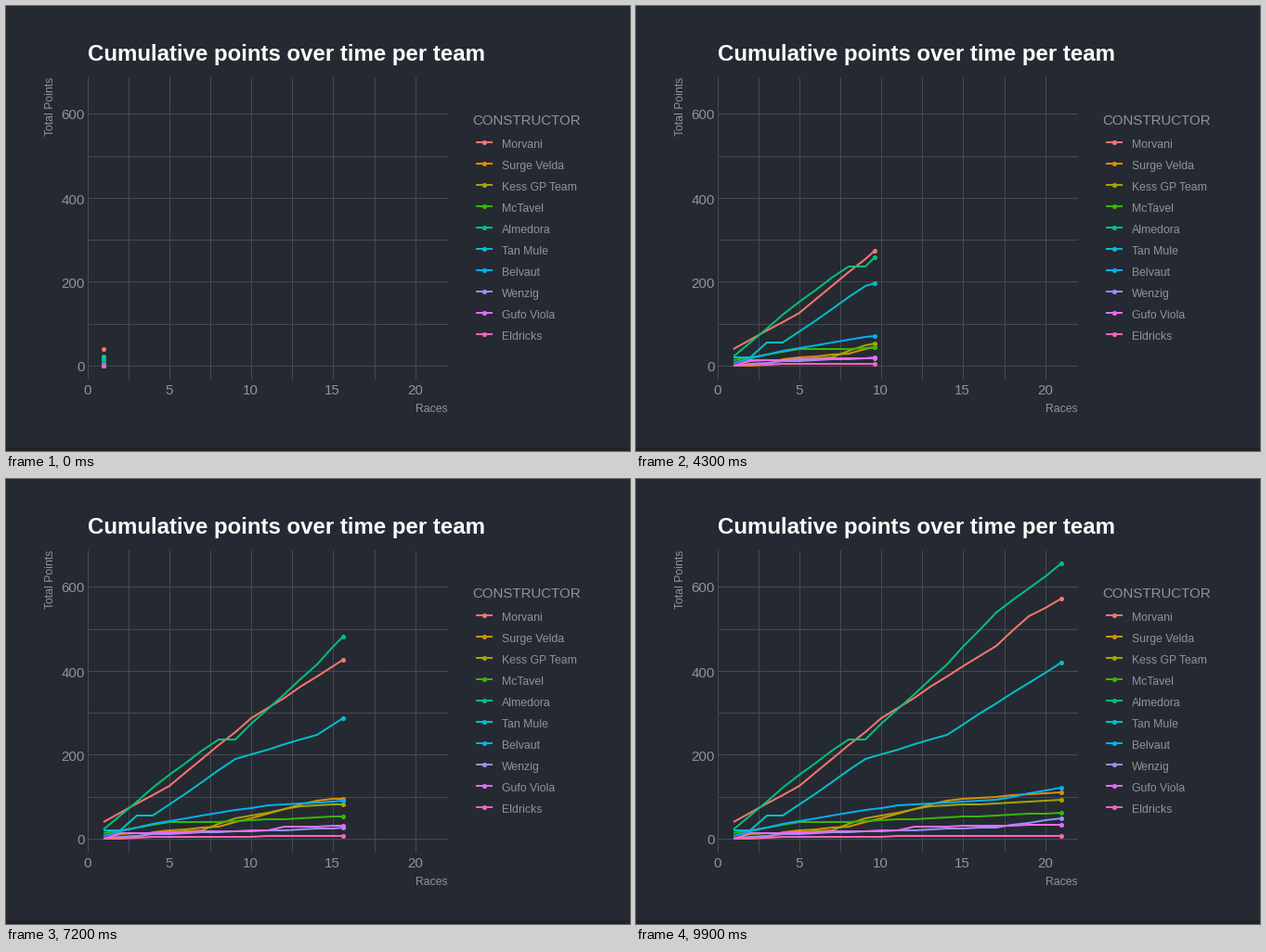
Recreate the animation shown at these times as a matplotlib script. Size 672x480 px, loop 10 s.

```python
import numpy as np
import matplotlib.pyplot as plt
from matplotlib.animation import FuncAnimation
from matplotlib.patches import Circle, Rectangle

W, H, DPI = 672, 480, 96
PX = 72 / DPI                      # one pixel in points
FRAMES, RACES = 100, 21
BG, GRID, TEXT = "#252a32", "#464950", "#929299"

LEFT, RIGHT, TOP, BOTTOM = 88, 476, 77, 403
X0, Y0 = 88.2, 388.3               # pixel position of the data origin
SX, SY = 17.65, 0.4525             # pixels per race and per point

plt.rcParams["font.family"] = "Liberation Sans"
fig = plt.figure(figsize=(W / DPI, H / DPI), dpi=DPI, facecolor=BG)
ax = fig.add_axes([0, 0, 1, 1])
ax.set_xlim(0, W)
ax.set_ylim(H, 0)
ax.axis("off")


def px(x):
    return np.floor(X0 + SX * np.asarray(x, float))


def py(y):
    return np.floor(Y0 - SY * np.asarray(y, float))


def label(x, y, s, size, color=TEXT, **kw):
    kw = {"ha": "left", "va": "baseline", **kw}
    return ax.text(x, y, s, fontsize=size * PX, color=color, **kw)


def stroke(xs, ys, color, width, z):
    return ax.plot(xs, ys, color=color, lw=width * PX, zorder=z, snap=False,
                   solid_capstyle="butt")[0]


def dot(x, y, color, z):
    return ax.add_patch(Circle((x, y), 2.55, color=color, lw=0, zorder=z))


# Background, grid and axes
ax.add_patch(Rectangle((0, 476), W, 4, color="#22222b", lw=0))
for v in np.arange(0, 21, 2.5):
    x = px(v) + 0.5
    stroke([x, x], [TOP, BOTTOM], GRID, 1, 1)
    if v % 5 == 0:
        label(x - 0.8, 419, f"{v:.0f}", 15, ha="center")
for v in range(0, 601, 100):
    y = py(v) + 0.5
    stroke([LEFT, RIGHT], [y, y], GRID, 1, 1)
    if v % 200 == 0:
        label(85, y + 6, str(v), 15, ha="right")

label(88, 59, "Cumulative points over time per team", 24, "white", weight="bold")
label(476, 438, "Races", 12.2, ha="right")
label(51, 77, "Total Points", 12.2, ha="right", rotation=90, rotation_mode="anchor")
label(502.5, 128, "CONSTRUCTOR", 15)

races = np.arange(1, RACES + 1)
teams = []


def add_team(name, color, *knots):
    """Legend entry and curve; knots are (race, total) turning points."""
    i = len(teams)
    y = 147 + 23 * i
    stroke([506, 524], [y, y], color, 2, 3)
    dot(515.5, y + 0.5, color, 4)
    label(534, y + 6, name, 12.2)
    totals = np.interp(races, *zip(*knots))
    teams.append((totals, stroke([], [], color, 2, 5), dot(0, 0, color, 6)))


add_team("Morvani", "#F8766D",
         (1, 40), (5, 126), (10, 287), (17, 460), (19, 530), (21, 571))
add_team("Surge Velda", "#D89000",
         (1, 0), (3, 1), (4, 16), (8, 28), (14, 91), (21, 111))
add_team("Kess GP Team", "#A3A500",
         (1, 0), (2, 10), (7, 19), (9, 49), (13, 76), (21, 93))
add_team("McTavel", "#39B600", (1, 12), (5, 40), (8, 40), (21, 62))
add_team("Almedora", "#00BF7D",
         (1, 22), (5, 153), (8, 237), (9, 237), (14, 415), (17, 538), (21, 655))
add_team("Tan Mule", "#00BFC4",
         (1, 20), (2, 20), (3, 55), (4, 55), (9, 189), (14, 248), (21, 419))
add_team("Belvaut", "#00B0F6",
         (1, 7), (4, 35), (11, 80), (17, 92), (21, 122))
add_team("Wenzig", "#9590FF", (1, 0), (4, 10), (17, 27), (21, 48))
add_team("Gufo Viola", "#E76BF3",
         (1, 0), (2, 12), (11, 20), (12, 28), (21, 33))
add_team("Eldricks", "#FF62BC", (1, 0), (4, 4), (21, 7))

# Each race lands on a whole frame; the reveal is linear in between.
arrival = np.round((races - 1) * (FRAMES - 1) / (RACES - 1))


def update(frame):
    now = np.interp(frame, arrival, races)
    xs = np.append(races[races < now], now)
    for totals, line, head in teams:
        ys = np.interp(xs, races, totals)
        line.set_data(px(xs), py(ys))
        head.center = px(now) + 0.5, py(ys[-1]) + 0.5
    return [artist for team in teams for artist in team[1:]]


anim = FuncAnimation(fig, update, frames=FRAMES, interval=100, repeat=True,
                     repeat_delay=0, blit=False, cache_frame_data=False)
plt.show()
```
